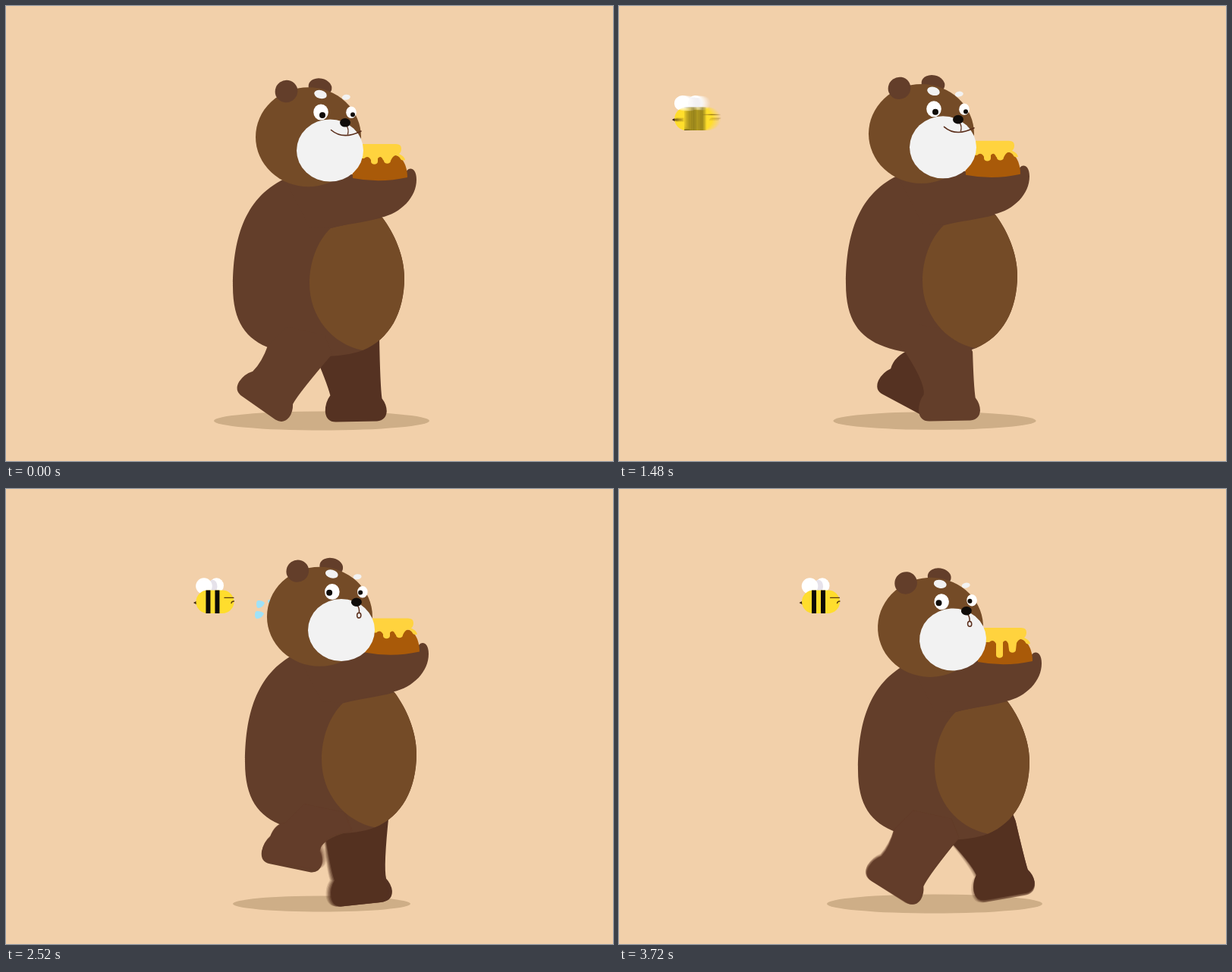
Write an HTML page with a canvas that moves like this. It is 800x600 px and loops after 3.76 s.

```html
<!DOCTYPE html>
<html lang="en">
<head>
<meta charset="utf-8">
<title>Bear and bee</title>
<style>
html, body { margin: 0; width: 100%; height: 100%; overflow: hidden; background: #f2d0aa; }
canvas { display: block; }
</style>
</head>
<body>
<canvas id="stage" width="800" height="600"></canvas>
<script>
const ctx = document.getElementById('stage').getContext('2d');
const LOOP = 3760, FRAME = 40, WALK_END = 1920, RUN_START = 2120;
const C = {
  bg: '#f2d0aa', shadow: '#ceae87', fur: '#633e2a', far: '#553222', belly: '#744b27',
  white: '#f2f2f2', black: '#100c09', line: '#5b2f1c',
  honey: '#ffd33e', cake: '#a95a09', bee: '#ffdd2d', sweat: '#9fe2f8'
};

// Foot poses over one stride: phase, sole x, sole y, tilt in degrees
const WALK = [
  [0, 462, 548, -1], [.042, 436, 547, -1], [.25, 385, 547, 5], [.458, 337, 535, 31],
  [.5, 333, 530, 35], [.542, 372, 525, 28], [.7, 425, 518, 5], [.87, 490, 534, -10],
  [.958, 469, 546, -2], [1, 462, 548, -1]
];
const RUN = [
  [0, 495, 540, -10], [.125, 451, 548, -6], [.375, 371, 540, 16], [.5, 338, 531, 33],
  [.625, 360, 497, 10], [.75, 425, 490, -2], [.875, 489, 507, -10], [1, 495, 540, -10]
];

const clamp = v => Math.max(0, Math.min(1, v));
const lerp = (a, b, k) => a + (b - a) * k;
const wrap = v => v - Math.floor(v);
const ramp = (t, a, b) => clamp((t - a) / (b - a));
const smooth = (t, a, b) => { const s = ramp(t, a, b); return s * s * (3 - 2 * s); };
const tri = p => 1 - Math.abs(1 - 2 * wrap(p));

function fill(path, color) {
  ctx.fillStyle = color;
  ctx.fill(new Path2D(path));
}
function stroke(path, color, width) {
  ctx.strokeStyle = color;
  ctx.lineWidth = width;
  ctx.lineCap = 'round';
  ctx.stroke(new Path2D(path));
}
function oval(x, y, rx, ry, color, tilt = 0) {
  ctx.fillStyle = color;
  ctx.beginPath();
  ctx.ellipse(x, y, rx, ry, tilt * Math.PI / 180, 0, 7);
  ctx.fill();
}
function at(x, y, draw) {
  ctx.save();
  ctx.translate(x, y);
  draw();
  ctx.restore();
}
// Averages several moments inside the shutter time
function blur(t, n, shutter, draw) {
  for (let i = 0; i < n; i++) {
    ctx.globalAlpha = 1 / (i + 1);
    draw(t + (n > 1 ? (i / (n - 1) - .5) * shutter : 0));
  }
  ctx.globalAlpha = 1;
}

function bob(t) {
  if (t < WALK_END) return tri(t / 480);
  if (t < RUN_START) return .4 * tri((t - WALK_END) / 200);
  return tri((t - 3720) / 320);
}
function stride(t) {
  if (t < WALK_END) return t / 960;
  if (t < RUN_START) return .54 * (t - WALK_END) / 200;
  return Math.max(.54, 3 + (t - 3720) / 640);
}
function look(table, phase) {
  const p = wrap(phase);
  let i = 1;
  while (table[i][0] < p) i++;
  const a = table[i - 1], b = table[i], k = (p - a[0]) / (b[0] - a[0]);
  return a.map((v, j) => lerp(v, b[j], k));
}
function footPose(t, shift) {
  const p = stride(t) + shift, w = ramp(t, RUN_START - 60, RUN_START + 140);
  const a = look(WALK, p), b = look(RUN, p);
  return a.map((v, j) => lerp(v, b[j], w));
}

function leg(t, near, drop) {
  const [, x, y, deg] = footPose(t, near ? .5 : 0);
  const r = deg * Math.PI / 180, cos = Math.cos(r), sin = Math.sin(r);
  const pt = (u, v) => [x + u * cos - v * sin, y + u * sin + v * cos];
  const left = near ? [345 + .24 * (x - 333), 448 + drop] : [405 + .22 * (x - 462), 455 + drop];
  const right = near ? [430 + .35 * (x - 333), 459 + drop] : [492 + .45 * (x - 462), 437 + drop];
  const curve = (a, b) => ctx.quadraticCurveTo(...a, ...b);
  ctx.fillStyle = near ? C.fur : C.far;
  ctx.beginPath();
  ctx.moveTo(...left);
  curve(pt(near ? -31 : -38, -52), pt(-34, -35));
  curve(pt(-41, -26), pt(-41, -14));
  curve(pt(-40, 0), pt(-27, 0));
  ctx.lineTo(...pt(27, 0));
  curve(pt(39, -1), pt(40, -13));
  curve(pt(40, -22), pt(34, -30));
  curve(pt(32, -46), right);
  ctx.lineTo(right[0] - 10, right[1] - 25);
  ctx.lineTo(left[0] + 25, left[1] - 25);
  ctx.fill();
}

// Squash or stretch below the shoulders
function trunk(dy, path, color) {
  ctx.save();
  ctx.translate(0, 230 + dy);
  ctx.scale(1, 1 - dy * .33 / 224);
  ctx.translate(0, -230);
  fill(path, color);
  ctx.restore();
}
function side(squat) {
  const e = 8 * squat, x = 525 + e;
  return `C${505 + e},440 ${x},${405 + e} ${x},${358 + 2 * e} C${x},${330 + e} 512,300 496,279`;
}
function body(dy, squat) {
  const x = 299 - 2 * squat;
  trunk(dy, `M367,228 C312,254 ${x},312 ${x},370 C${x},416 316,440 350,452
    C380,464 440,466 470,454 ${side(squat)} L440,215Z`, C.fur);
}
function belly(dy, squat) {
  trunk(dy, `M428,293 C410,310 400,338 400,366 C400,410 430,446 470,454 ${side(squat)}
    C470,286 450,287 428,293Z`, C.belly);
}
function arm() {
  fill(`M367,228 L457,222 L527,222 C527,212 541,210 541,229 C541,252 521,273 494,279
    C470,285 450,287 428,293 L400,292Z`, C.fur);
}
function cake(long) {
  const a = 209 + 13 * long, b = 208 + 7 * long;
  fill(`M457,227 C456,215 459,204 464,199 L514,197 C521,198 529,209 529,226 Q493,234 457,227Z`, C.cake);
  fill(`M465,182 H514 Q521,182 521,188 Q521,193 518,195 Q525,198 526,203 Q521,205 519,200 Q513,193 508,202
    L507,${b - 4} C507,${b + 1} 498,${b + 1} 498,${b - 4} L497,203 Q494,196 490,201 L490,${a - 4}
    C490,${a + 1} 481,${a + 1} 481,${a - 4} L481,203 Q477,196 472,201 L465,201Z`, C.honey);
}

function head(scared) {
  oval(414, 107, 15.5, 11.5, C.fur, 12);
  oval(398.5, 172.7, 69.5, 65.5, C.belly);
  oval(369.5, 112.5, 15, 14.5, C.fur, -35);
  oval(427, 190.5, 44, 41, C.white);
  oval(414.5, 116.5, 8.5, 5.5, C.white, 15);
  oval(448.3, 120.3, 5.5, 3.5, C.white, -8);
  oval(415, 140, 9.8, 10.5, '#fff');
  oval(455, 140.3, 6.8, 7.7, '#fff');
  oval(lerp(417, 411.3, scared), lerp(144, 141.2, scared), 4, 4, C.black);
  oval(lerp(457, 452.3, scared), lerp(143.3, 141.2, scared), 3, 3, C.black);
  if (scared > .5) {
    stroke('M448,158 Q451,161 450.5,167', C.line, 1.5);
    ctx.strokeStyle = C.line;
    ctx.beginPath();
    ctx.ellipse(450.3, 171.2, 2.6, 3.4, 0, 0, 7);
    ctx.stroke();
  } else {
    stroke('M428.5,163.5 Q444,177 468,165', C.line, 1.6);
    stroke('M449.5,159 Q452,163 450.5,169', C.line, 1.3);
  }
  oval(447, 153.8, 7, 5.8, C.black);
}

function beeX(t) {
  return lerp(-28, 277.5, smooth(t, 1090, 1950)) - 11.5 * smooth(t, 2420, 2790);
}
function bee(t) {
  at(beeX(t), 0, () => {
    const flap = .98 + .03 * Math.cos(t * Math.PI / 60);
    ctx.save();
    ctx.translate(0, 139);
    ctx.scale(1, flap);
    oval(2, -11.5, 9.5, 10, '#fff');
    oval(-3, -10.5, 6, 8.5, '#e6e2ea');
    oval(-14.5, -11, 10.8, 10.5, '#fff');
    ctx.restore();
    fill('M-28.5,150 L-23,147 V153Z', '#3a2312');
    ctx.fillStyle = C.bee;
    ctx.beginPath();
    ctx.roundRect(-25, 133.5, 50, 30.5, 15.2);
    ctx.fill();
    fill('M-12,133.5 h6 v30.5 h-6Z M0,133.5 h6 v30.5 h-6Z', '#0d0b08');
    stroke('M12.5,143.3 H24.5 M21.5,150.5 Q22,148 25,148', '#5a3b10', 1.3);
  });
}

function sweat(t, dy) {
  if (t < 2440) return;
  const age = wrap((t - 2440) / 320) * 320;
  if (age === 0 || age > 280) return;
  const k = (age - 80) / 160;
  const drop = (x, y, w, h) => {
    w = Math.max(w, 1);
    at(x, y + dy, () => fill(`M${w / 2},${-h / 6} Q${w / 4},${h / 2} ${-w / 4},${h / 2}
      Q${-w / 2},${h / 2} ${-w / 2},0 Q${-w / 2},${-h / 2} ${-w / 4},${-h / 2} Q${w / 4},${-h / 2} ${w / 2},${-h / 6}Z`, C.sweat));
  };
  drop(lerp(335.5, 325, k), lerp(152, 154, k), lerp(11, 17, k), 10);
  drop(lerp(334, 326, k), lerp(166, 173, k), lerp(12, 8, k), lerp(10, 6, k));
  drop(lerp(347, 342, k), lerp(148, 142, k), lerp(4, 10, k), lerp(4, 8, k));
}

function draw(t) {
  const b = bob(t), run = smooth(t, 1900, 2080);
  const squat = Math.max(0, 1 - Math.abs(t - RUN_START) / 160);
  const dx = 16 * run, dy = run - 25 * b + 11 * squat, drop = dy * .67;
  const shots = t >= 2000 ? 6 : 1;

  ctx.fillStyle = C.bg;
  ctx.fillRect(0, 0, 800, 600);
  oval(416, 547, 142 - 50 * b - 7 * squat, 12.5 - 4 * b, C.shadow);
  if (t > 1090) blur(t, t < 1900 ? 7 : 1, 20, bee);

  at(dx, 0, () => {
    blur(t, shots, 13, s => leg(s, false, drop));
    body(dy, squat);
    blur(t, shots, 13, s => leg(s, true, drop));
    belly(dy, squat);
    at(0, dy, () => {
      arm();
      cake(ramp(t, 2560, 3040) + .35 * squat);
    });
  });
  sweat(t, dy + 11.5);

  // The running head nods around the muzzle
  at(427 + run * (13 + 4 * b), 190 + dy + 7 * run, () => {
    ctx.rotate(run * (.11 * b - .058));
    ctx.translate(-427, -190);
    head(run);
  });
}

const start = performance.now();
function tick() {
  const t = (performance.now() - start) % LOOP;
  draw(Math.floor(t / FRAME) * FRAME);
  requestAnimationFrame(tick);
}
tick();
</script>
</body>
</html>
```
